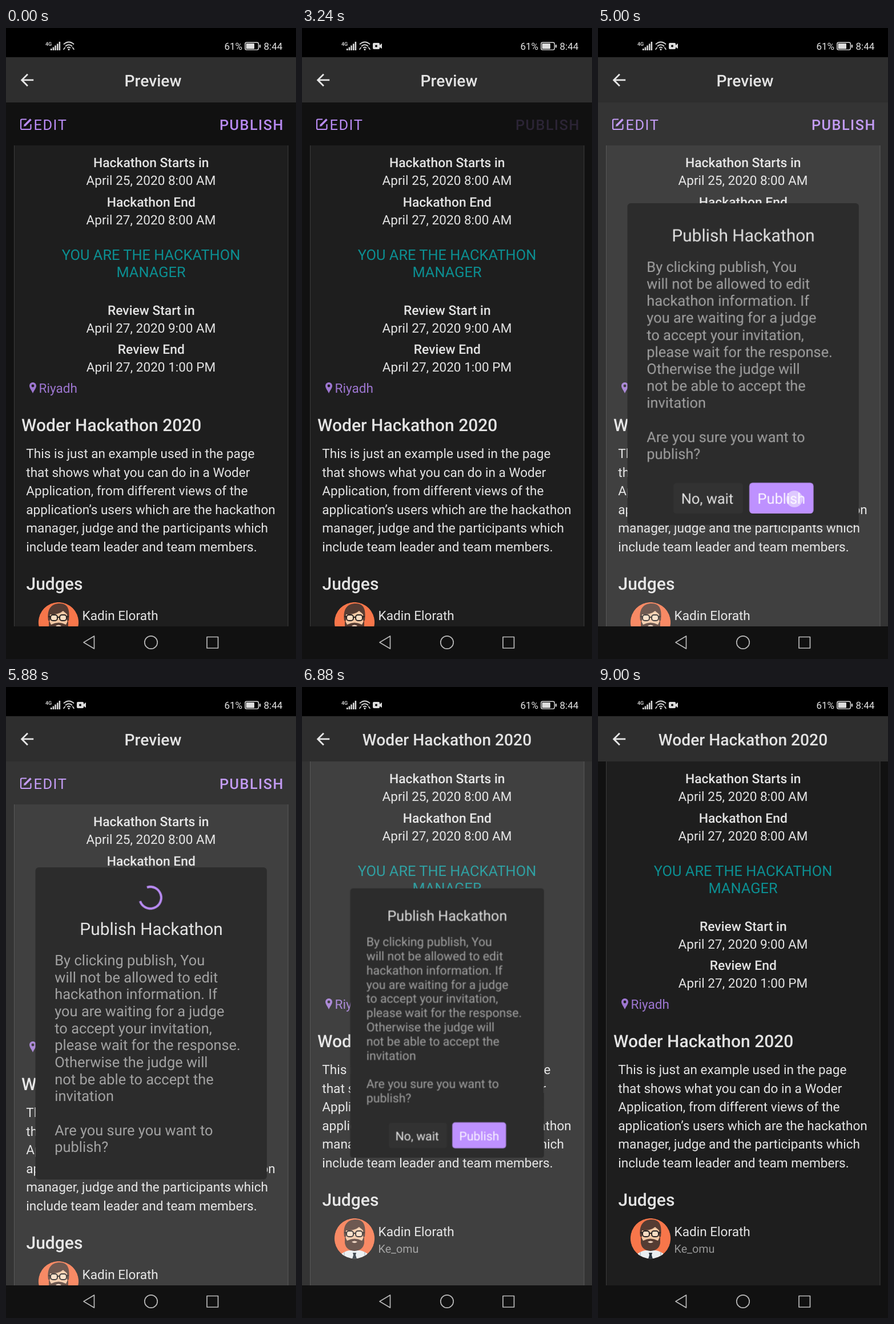
These frames come from a looping animation (508 px wide and 1102 px high, 9040 ms). An HTML page:

```html
<!DOCTYPE html>
<html lang="en">
<head>
<meta charset="utf-8">
<title>Publish flow</title>
<style>
html, body { margin: 0; width: 100%; height: 100%; overflow: hidden; background: #111; }
svg { display: block; width: 100vw; height: 100vh; }
text { font-family: Roboto, "Noto Sans", sans-serif; white-space: pre; text-rendering: geometricPrecision; }
#pop { transform-origin: 254px 587px; }
#spin { transform-origin: 253px 368px; }
</style>
</head>
<body>
<svg viewBox="0 0 508 1102">
  <defs>
    <clipPath id="view"><rect y="130" width="508" height="915"/></clipPath>
    <clipPath id="disc"><circle r="35.3"/></clipPath>
  </defs>
  <rect width="508" height="1102" fill="#111"/>

  <g id="tools" fill="#b98bf4">
    <g fill="none" stroke="#b98bf4" stroke-width="2.2">
      <path d="M36 159.500H28Q26 159.500 26 161.500V175Q26 177 28 177H41.500Q43.500 177 43.500 175V168"/>
      <path d="M33 170L43.500 159.500" stroke-width="3.600"/>
    </g>
    <path d="M31 172L32 167.500 35.500 171Z"/>
    <g id="publish"></g>
  </g>

  <g clip-path="url(#view)">
    <g id="list">
      <rect x="14" y="205" width="480.500" height="930" fill="#1e1e1e"/>
      <path d="M14.500 205V1135M494 205V1135" stroke="#3b3b3b"/>
      <path fill="#9d76d0" fill-rule="evenodd" d="M47 619C43.500 619 41 621.600 41 625C41 629 45 633 47 638C49 633 53 629 53 625C53 621.600 50.500 619 47 619ZM47 622.600A2.400 2.400 0 1 1 47 627.400A2.400 2.400 0 1 1 47 622.600Z"/>
      <g transform="translate(92 1038)" clip-path="url(#disc)">
        <circle r="35.300" fill="#f7764a"/>
        <path d="M-28 36Q-26 25 -10 21H10Q26 25 28 36Z" fill="#e9edf0"/>
        <path d="M-18 24V36M18 24V36" stroke="#b9c3ca" stroke-width="2"/>
        <path d="M-3 25H3L2 29 4 36H-4L-2 29Z" fill="#26303a"/>
        <path d="M-18 -3C-21 -24 -12 -33 2 -33C17 -33 20 -22 18 -3Z" fill="#553c33"/>
        <path d="M-15 -14Q0 -13 8 -20Q13 -16 15 -14V10H-15Z" fill="#f3c8a4"/>
        <path d="M-17 -4L-13 4Q0 -3 13 4L17 -4V8Q15 21 0 22Q-15 21 -17 8Z" fill="#553c33"/>
        <path d="M-5 6Q0 3 5 6Q0 10 -5 6Z" fill="#f0d2bd"/>
        <g fill="#f8dcc2" stroke="#2b2523" stroke-width="2">
          <rect x="-14" y="-13" width="12" height="10" rx="4"/>
          <rect x="2" y="-13" width="12" height="10" rx="4"/>
          <path d="M-2 -9H2M-18 -10H-14M14 -10H18"/>
        </g>
      </g>
    </g>
    <rect id="shade" y="130" width="508" height="915" fill="#fff"/>
  </g>

  <rect y="51" width="508" height="79" fill="#2e2e2e"/>
  <path transform="translate(20 74) scale(1.411)" fill="#e6e6e6" d="M20 11H7.830l5.590-5.590L12 4l-8 8 8 8 1.410-1.410L7.830 13H20z"/>
  <g id="head1"></g>
  <g id="head2"></g>

  <rect width="508" height="51" fill="#000"/>
  <g id="status" fill="#dcdcdc">
    <path d="M78 36h2.500v3H78zM81.700 33.500h2.500V39h-2.500zM85.300 30.500h2.500V39h-2.500zM89 27.500h2.500V39H89zM92.600 24h2.500v15h-2.500z"/>
    <g fill="none" stroke="#dcdcdc" stroke-width="1.700">
      <path d="M101 28.500Q110 20.500 119 28.500M104 32Q110 26.500 116 32M107 35Q110 32 113 35M101 38A5 5 0 0 1 104 34M119 38A5 5 0 0 0 116 34"/>
      <rect x="418.800" y="25.300" width="23.500" height="12.800" rx="2.500" stroke-width="1.400"/>
    </g>
    <circle cx="110" cy="37.500" r="1.600"/>
    <rect x="420.500" y="27" width="14.500" height="9.400" rx="1"/>
    <rect x="443.800" y="29" width="2.200" height="5.500" rx="1"/>
    <path id="cam" fill-rule="evenodd" d="M126 26H134Q136 26 136 28V30L140 27V36L136 33.500V35Q136 37 134 37H126Q124 37 124 35V28Q124 26 126 26ZM130 29.500A2 2 0 1 0 130 33.500A2 2 0 1 0 130 29.500Z"/>
  </g>

  <g fill="none" stroke="#b9b9b9" stroke-width="1.700" stroke-linejoin="round">
    <path d="M136 1073L154.500 1062V1084Z"/>
    <circle cx="254" cy="1073" r="11.200"/>
    <rect x="352" y="1063.500" width="19.500" height="19.500"/>
  </g>

  <g id="pop">
    <g id="ready">
      <rect x="51.500" y="306" width="405.500" height="562" rx="6" fill="#2c2c2c"/>
      <rect x="132" y="794.500" width="122" height="53.500" rx="5" fill="#323232"/>
      <rect x="265" y="794" width="112.500" height="54" rx="6" fill="#be91ff"/>
    </g>
    <g id="busy">
      <rect x="51.500" y="315" width="405.500" height="545" rx="6" fill="#2c2c2c"/>
      <path id="spin" d="M266.500 354.500A19 19 0 1 0 266.500 381.500" fill="none" stroke="#b98bf4" stroke-width="4"/>
    </g>
    <g id="words"></g>
  </g>
  <circle id="tap1" cx="452" cy="178" r="14.500" fill="#fff"/>
  <circle id="tap2" cx="344" cy="822.500" r="14.500" fill="#fff"/>
</svg>
<script>
const LOOP = 9040, OPEN = 3260, BUSY = 5720, SWITCH = 6200, DONE = 6640, CLOSE = 6849;
const $ = id => document.getElementById(id);
const EVENT = 'Woder Hackathon 2020';
const LIGHT = '#e3e3e3', GREY = '#a2a2a2';

// y is the middle of the capitals
function put(parent, str, x, y, size, opt = {}) {
  const el = document.createElementNS('http://www.w3.org/2000/svg', 'text');
  const attrs = { x, y: y + size * 0.355, 'font-size': size, fill: LIGHT, ...opt };
  for (const k in attrs) el.setAttribute(k, attrs[k]);
  el.textContent = str;
  $(parent).append(el);
}
const mid = { 'text-anchor': 'middle' };
const bold = { 'font-weight': 500 };
const button = { fill: '#b98bf4', 'letter-spacing': 1.5 };

put('status', '4G', 69, 27.5, 9, bold);
put('status', '61%', 382.5, 32, 17);
put('status', '8:44', 451.5, 32, 17);
put('head1', 'Preview', 257.5, 92, 28.2, { ...mid, ...bold });
put('head2', EVENT, 254, 92, 28.2, { ...mid, ...bold });
put('tools', 'EDIT', 48.5, 169, 25.4, button);
put('publish', 'PUBLISH', 374, 169, 25.2, { ...button, ...bold });

[
  ['Hackathon Starts in', 235, 'April 25, 2020 8:00 AM'],
  ['Hackathon End', 303.5, 'April 27, 2020 8:00 AM'],
  ['Review Start in', 492.5, 'April 27, 2020 9:00 AM'],
  ['Review End', 560.5, 'April 27, 2020 1:00 PM']
].forEach(([label, y, date]) => {
  put('list', label, 254.3, y, 22.85, { ...mid, ...bold });
  put('list', date, 254, y + 31, 22.58, mid);
});
const teal = { ...mid, fill: '#0c8f92' };
put('list', 'YOU ARE THE HACKATHON', 254, 395.5, 25.4, teal);
put('list', 'MANAGER', 254, 425.5, 25.4, teal);
put('list', 'Riyadh', 57.5, 629, 22.58, { fill: '#9d76d0' });
put('list', EVENT, 27, 693, 30, bold);
[
  'This is just an example used in the page',
  'that shows what you can do in a Woder',
  'Application, from different views of the',
  'application’s users which are the hackathon',
  'manager, judge and the participants which',
  'include team leader and team members.'
].forEach((s, i) => put('list', s, 35.3, 743 + i * 32.5, 22.58));
put('list', 'Judges', 35.5, 970.5, 30, bold);
put('list', 'Kadin Elorath', 133.5, 1026, 22.58);
put('list', 'Ke_omu', 133.5, 1055.5, 19.75, { fill: '#959595' });

put('ready', 'No, wait', 191.5, 822, 25.4, mid);
put('ready', 'Publish', 321.3, 822, 25.4, { ...mid, fill: '#fbf5ff' });
put('words', 'Publish Hackathon', 254.5, 362.5, 29.9, mid);
[
  'By clicking publish, You',
  'will not be allowed to edit',
  'hackathon information. If',
  'you are waiting for a judge',
  'to accept your invitation,',
  'please wait for the response.',
  'Otherwise the judge will',
  'not be able to accept the',
  'invitation',
  '',
  'Are you sure you want to',
  'publish?'
].forEach((s, i) => put('words', s, 85.3, 417 + i * 29.68, 25.4, { fill: GREY }));

// steps: [ms, value, easing]; a step without easing holds its value
function play(id, prop, steps) {
  const frames = steps.map(([ms, v, easing = 'step-end']) => ({ offset: ms / LOOP, [prop]: v, easing }));
  frames.push({ offset: 1, [prop]: steps[steps.length - 1][1] });
  $(id).animate(frames, { duration: LOOP, iterations: Infinity });
}
const show = (id, from, to, level = 1) => play(id, 'opacity', [[0, 0], [from, level], [to, 0]]);

play('cam', 'opacity', [[0, 0], [40, 1]]);
show('tap1', 2600, 2720, 0.5);
show('tap2', 5000, 5080, 0.5);
play('publish', 'opacity', [
  [0, 1], [3010, 1, 'linear'], [3200, 0.16], [OPEN, 0.16, 'linear'], [3400, 0.72, 'linear'], [3600, 1]
]);
play('tools', 'opacity', [[0, 1], [SWITCH, 0]]);
play('head1', 'opacity', [[0, 1], [SWITCH, 0]]);
play('head2', 'opacity', [[0, 0], [SWITCH, 1]]);
play('list', 'transform', [[0, 'translateY(0px)'], [SWITCH, 'translateY(-75px)']]);
play('shade', 'opacity', [
  [0, 0], [OPEN, 0, 'ease'], [OPEN + 100, 0.15], [CLOSE + 50, 0.15, 'ease'], [CLOSE + 170, 0]
]);
play('pop', 'opacity', [[0, 0], [OPEN, 1], [CLOSE + 40, 1, 'linear'], [CLOSE + 150, 0]]);
play('pop', 'transform', [
  [0, 'scale(.7)'], [OPEN, 'scale(.7)', 'ease'], [OPEN + 117, 'scale(1.05)', 'ease'],
  [OPEN + 208, 'scale(.95)', 'ease'], [OPEN + 260, 'scale(1)'],
  [CLOSE, 'scale(1)', 'ease'], [CLOSE + 150, 'scale(.5)']
]);
play('ready', 'opacity', [[0, 1], [BUSY, 0], [DONE, 1]]);
show('busy', BUSY, DONE);
play('words', 'transform', [[0, 'translateY(0px)'], [BUSY, 'translateY(60px)'], [DONE, 'translateY(0px)']]);
play('spin', 'transform', [[0, 'rotate(-192deg)'], [BUSY, 'rotate(-192deg)', 'linear'], [DONE, 'rotate(28.8deg)']]);
</script>
</body>
</html>
```
